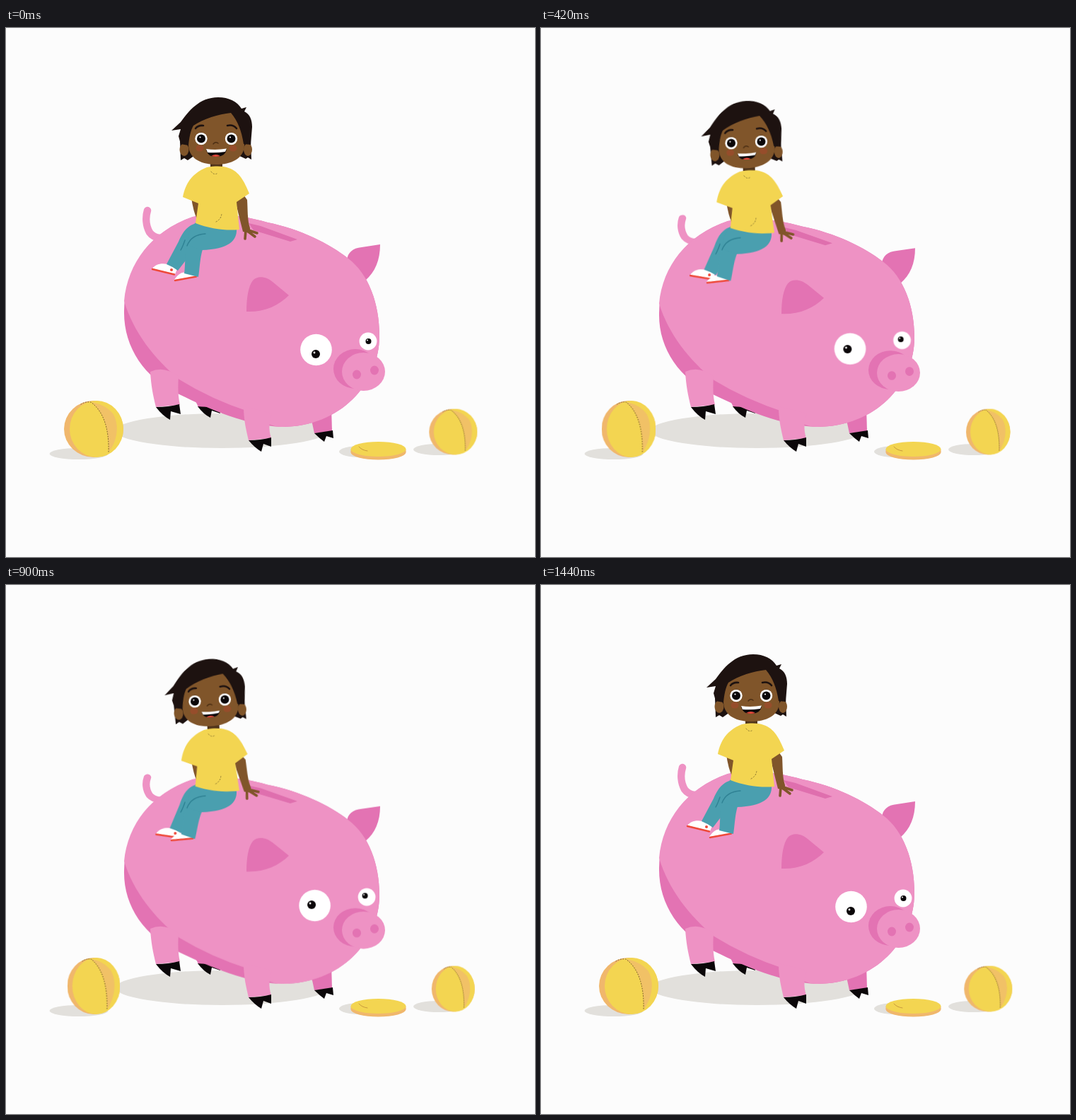
Recreate the animation shown at these times as an HTML page without scripts. Size 748 px wide and 748 px high, loop 1500 ms.

```html
<!DOCTYPE html>
<html lang="en">
<head>
<meta charset="utf-8">
<title>Piggy bank</title>
<style>
  html, body { margin: 0; width: 100%; height: 100%; overflow: hidden; background: #fcfcfc; }
  svg { display: block; width: 100%; height: 100%; }

  /* Every part swings to its own --to pose and back, twelve steps each way. */
  .sway { animation: sway 1.5s steps(12) infinite; transform-box: view-box; }
  @keyframes sway {
    0%, 96%, 100% { transform: none; }
    48% { transform: var(--to); }
  }

  .lid { animation: blink 1.5s step-end infinite; }
  @keyframes blink {
    0%, 60%, 100% { transform: translateY(0); }
    40%, 56% { transform: translateY(10px); }
    44%, 52% { transform: translateY(15px); }
    48% { transform: translateY(18px); }
  }

  .gap { fill: #fcfcfc; opacity: 0; animation: gap 1.5s step-end infinite; }
  @keyframes gap {
    0%, 60% { opacity: 0; }
    40% { opacity: 1; }
  }

  .pink { fill: #ee92c4; }
  .rose { fill: #e373b3; }
  .gold { fill: #f3d551; }
  .edge { fill: #f0b76c; }
  .skin { fill: #80552a; }
  .hair { fill: #1d1210; }
  .denim { fill: #4a9faf; }
  .shade { fill: #e2e0dc; }
  .white { fill: #fff; }
  .ink { fill: #0b0709; }
  .line { fill: none; stroke-linecap: round; stroke-linejoin: round; }
</style>
</head>
<body>
<svg viewBox="0 0 748 748">
  <defs>
    <g id="coin">
      <ellipse class="edge" rx="42" ry="40"/>
      <ellipse class="gold" cx="4" rx="38" ry="40"/>
      <path d="M-4-38C14-25 22 0 21 33C32 20 38-5 27-22C18-32 8-36-4-38Z" fill="#f1c166"/>
      <path class="line" d="M-18-35Q-12-39-4-38C14-25 22 0 21 33" stroke="#70581f" stroke-dasharray="1 2.5"/>
    </g>
    <clipPath id="socket"><circle r="9.2"/></clipPath>
    <g id="eye">
      <circle class="white" r="8.7"/>
      <circle class="ink" r="6"/>
      <circle class="white" cx="-1.5" cy="-2" r="1.1"/>
    </g>
    <g id="lid">
      <rect class="skin" x="-11" y="-32" width="22" height="22"/>
      <path class="line" d="M-10-10.5Q0-9 10-10.5" stroke="#1d1210" stroke-width="1.8"/>
    </g>
  </defs>

  <rect width="748" height="748" fill="#fcfcfc"/>

  <g class="shade">
    <ellipse cx="305" cy="569.5" rx="150" ry="24.5"/>
    <ellipse cx="103" cy="602" rx="41.5" ry="8"/>
    <ellipse cx="502" cy="599" rx="31" ry="8"/>
    <ellipse cx="612" cy="596" rx="36" ry="8"/>
  </g>

  <!-- far legs -->
  <path class="rose" d="M262 515L305 530L300 537L272 536Z"/>
  <path class="ink" d="M271 535Q286 537 300 534L303 545L291 541L289 551Q279 546 271 535Z"/>
  <path class="rose" d="M430 545L436 573L461 570L460 535Z"/>
  <path class="ink" d="M436 573L462 569L463 580L453 577L450 585Q443 580 436 573Z"/>

  <!-- body -->
  <g class="sway" style="--to:scaleY(.966);transform-origin:0 565px">
    <path class="line sway" d="M200 258C197 268 198 280 203 289Q208 296 218 297" stroke="#ee92c4" stroke-width="10.5"
      style="--to:scaleY(.79);transform-origin:216px 297px"/>
    <path class="rose" d="M482 328C483 318 490 311 503 310L529 306C529 328 522 345 508 357L494 350Z"/>
    <path class="rose" d="M167 400C168 338 203 288 264 267C300 260 335 265 370 275C415 284 458 305 484 326C513 348 528 390 528 435C528 503 473 564 390 564C340 562 290 540 245 518C195 495 166 450 167 400Z"/>
    <path class="pink" d="M167 386C172 332 206 287 264 267C300 260 335 265 370 275C415 284 458 305 484 326C513 348 528 390 528 435C528 503 473 564 390 564Q370 564 345 543Q290 525 245 497C210 468 180 430 167 386Z"/>
    <path d="M343 276L360 280L412 299L402 302L350 286Z" fill="#df6fae"/>
    <path class="rose" d="M340 401C340 380 343 365 349 357C356 349 369 352 377 359L400 378C385 393 365 402 340 401Z"/>
    <ellipse class="rose" cx="494" cy="482" rx="31" ry="28"/>
    <ellipse class="pink" cx="505.5" cy="486" rx="30.5" ry="27"/>
    <ellipse class="rose" cx="496" cy="490" rx="6" ry="6.5"/>
    <ellipse class="rose" cx="521" cy="484" rx="6" ry="6.5"/>
  </g>

  <g class="sway" style="--to:translate(-2.5px,-2.4px)">
    <circle class="white" cx="438.5" cy="455" r="22.3"/>
    <circle class="white" cx="512" cy="443" r="12.4"/>
    <g class="sway" style="--to:translate(-5.4px,-9.4px)">
      <circle class="ink" cx="438" cy="461" r="6"/>
      <circle class="white" cx="436" cy="459" r="1.4"/>
    </g>
    <g class="sway" style="--to:translate(-4px,-2.4px)">
      <circle class="ink" cx="512.5" cy="443" r="4"/>
      <circle class="white" cx="511" cy="441.5" r="1"/>
    </g>
  </g>

  <!-- near legs -->
  <path class="pink" d="M204 486Q224 477 244 493C243 507 243 520 246 533L212 536C208 520 205 505 204 486Z"/>
  <path class="ink" d="M212 536Q230 536 245 532L247 546L233 542L232 554Q221 548 212 536Z"/>
  <path class="pink" d="M336 535L376 545C372 557 371 567 375 580L343 583C340 570 336 555 336 535Z"/>
  <path class="ink" d="M343 583Q360 583 375 579L375 592L364 588L361 599Q351 593 343 583Z"/>

  <!-- rider -->
  <g class="sway" style="--to:translateY(9.6px)">
    <path class="skin" d="M262 240L273 246L270 270Q265 260 262 240Z"/>

    <g class="sway" style="--to:translate(2.4px,-5px) rotate(-7deg);transform-origin:345px 288px">
      <path class="skin" d="M322 236H336L341 243C342 258 341 270 345 283L345 290L335 288Z"/>
      <path class="line" d="M340 285L355 290M340 286L352 295M339 286L338 298" stroke="#80552a" stroke-width="3.6"/>
    </g>

    <g class="sway" style="--to:rotate(-7deg);transform-origin:258px 285px">
      <path class="white" d="M207 340C211 335 218 332 228 334L242 341L239 348Z"/>
      <circle cx="234" cy="342" r="2" fill="#ee4a3a"/>
      <path class="line" d="M207 341L238 348.5" stroke="#ee4a3a" stroke-width="2.4"/>
      <path class="denim" d="M270 276C255 279 249 291 244 302L227 334Q235 337 243 343L270 308Z"/>
    </g>
    <g class="sway" style="--to:rotate(7deg);transform-origin:270px 300px">
      <path class="white" d="M238 356C243 349 248 344 256 346L271 349L270 351Z"/>
      <path class="line" d="M239 357L269 351.5" stroke="#ee4a3a" stroke-width="2.4"/>
      <path class="denim" d="M280 296L278 313C274 326 274 340 272 352L252 347C254 335 252 317 257 306Q264 292 280 296Z"/>
    </g>
    <path class="denim" d="M268 275L326 284C327 301 314 313 277 314L257 307Q255 290 268 275Z"/>
    <path class="line" d="M282 291Q262 292 256 308M253 300Q250 309 247 314" stroke="#2f8294" stroke-width="1.4"/>

    <g class="sway" style="--to:rotate(-3.6deg);transform-origin:298px 285px">
      <path d="M289 189H306V200H289Z" fill="#50341a"/>
      <path class="gold" d="M284 197C297 195 306 195 315 198C330 203 337 217 344 234L326 246L330 285C312 287 288 284 268 276L272 248L250 239C254 220 262 206 284 197Z"/>
      <path class="line" d="M290 203Q294 208 298 206M297 274Q305 270 305 261" stroke="#8a7630" stroke-dasharray="1.5 2.5"/>

      <g class="sway" style="--to:translate(-3px,-1px) rotate(-1.4deg);transform-origin:297px 195px">
        <path class="hair" d="M246 160L247 187L252 184L257 187L267 180H328L339 185L342 183L347 186L346 160Z"/>
        <ellipse class="skin" cx="252" cy="172" rx="6.5" ry="9"/>
        <ellipse class="skin" cx="342" cy="172" rx="6" ry="9"/>
        <path class="skin" d="M258 150L262 132L318 117C328 128 336 145 337 165C337 185 318 193 297 193C272 193 258 182 258 165Z"/>
        <path class="hair" d="M234 145L247 133C258 118 273 98 300 98C315 98 327 104 333 114L340 112L337 118C345 122 348 130 348 140L346 165L336 164C333 145 328 132 318 120C300 122 280 128 265 138C261 145 259 155 258 166L247 164L244 153L247 143Z"/>
        <path class="line" d="M268 142Q272 137 279 138M313 138Q321 136 326 142" stroke="#1d1210" stroke-width="2.6"/>
        <g fill="#a34a2c" opacity=".65">
          <ellipse cx="274" cy="170" rx="5.5" ry="4.5"/>
          <ellipse cx="321" cy="170" rx="5.5" ry="4.5"/>
        </g>
        <g transform="translate(276 156.5)" clip-path="url(#socket)">
          <use href="#eye"/>
          <use class="lid" href="#lid"/>
        </g>
        <g transform="translate(318.5 156.5)" clip-path="url(#socket)">
          <use href="#eye"/>
          <use class="lid" href="#lid"/>
        </g>
        <path class="line" d="M293 164Q296 160 300 163" stroke="#4c2f14" stroke-width="1.5"/>
        <g class="sway" style="--to:scale(.85,.72);transform-origin:297px 175px">
          <path class="ink" d="M283 172Q297 174 312 171C311 178 306 182 297 182C289 182 285 179 283 172Z"/>
          <path class="white" d="M283 171Q297 173 312 170.5L310 175Q297 177 285 176Z"/>
          <path d="M290 181Q297 177 303 181Q297 183 290 181Z" fill="#e4483a"/>
        </g>
      </g>
    </g>
  </g>

  <!-- coins -->
  <ellipse class="edge" cx="526.5" cy="600" rx="39" ry="10.5"/>
  <path class="edge" d="M487.5 596H565.5V600H487.5Z"/>
  <ellipse class="gold" cx="526.5" cy="595.5" rx="39" ry="10.5"/>
  <path class="line" d="M499 592Q503 597 511 598" stroke="#c99a3e"/>

  <g transform="translate(124 567)">
    <use class="sway" href="#coin" style="--to:scaleX(.857)"/>
  </g>
  <g transform="translate(632.3 571) scale(.81)">
    <use class="sway" href="#coin" style="--to:scaleX(.86)"/>
  </g>
  <path class="gap" d="M148 525L144 610H170L171 525ZM660 540H668V604H660Z"/>
</svg>
</body>
</html>
```
